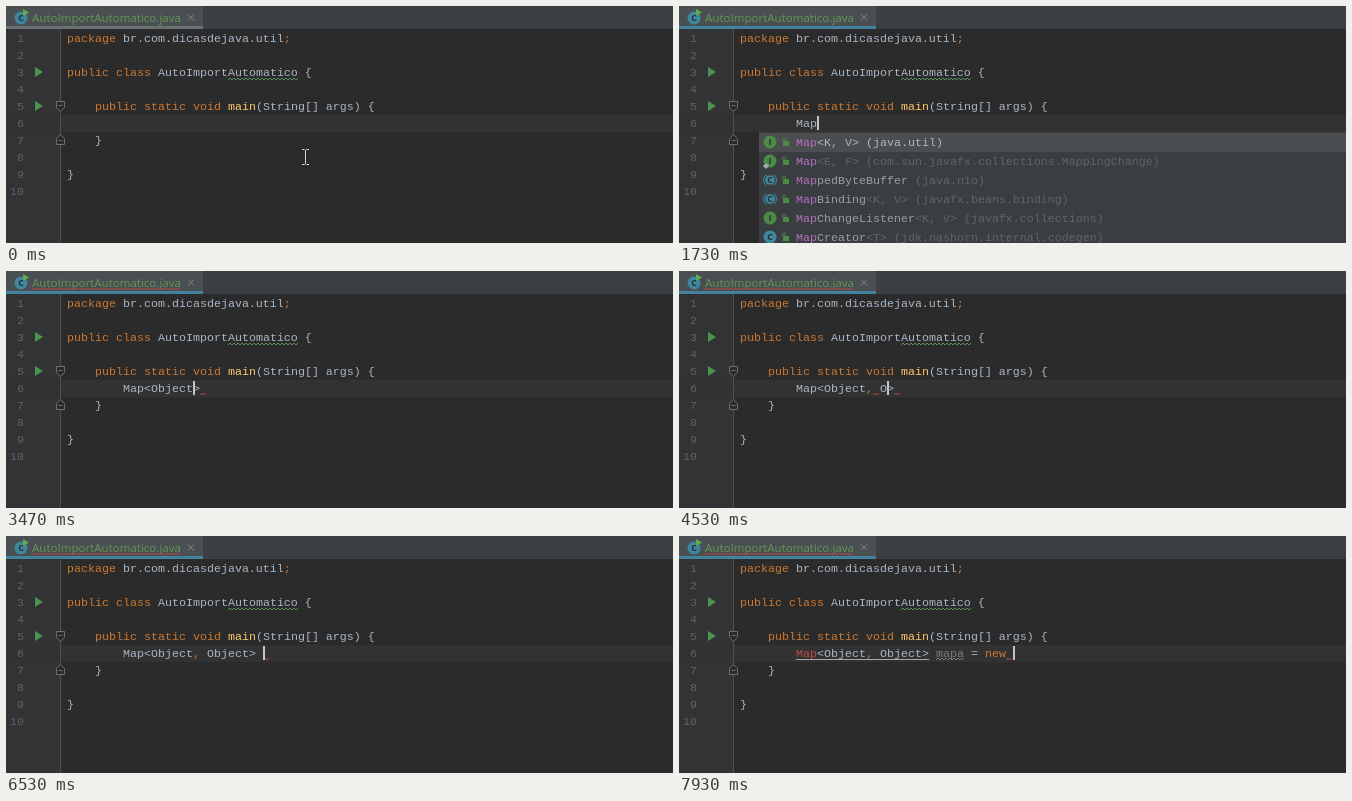
An HTML page for the animation above (8 s loop, 667 by 237 pixels).

```html
<!DOCTYPE html>
<html lang="en">
<head>
<meta charset="utf-8">
<title>Auto import</title>
<style>
  html, body { margin: 0; width: 100%; height: 100%; overflow: hidden; background: #2b2b2b; }
  svg { display: block; width: 667px; height: 237px; }
  text { white-space: pre; }
  .code { font: 11.667px "Liberation Mono", monospace; fill: #a9b7c6; }
  .ui { font: 11.55px "Open Sans", sans-serif; }
  .num { fill: #606366; text-anchor: end; }
  .badge { font: 700 9px "Open Sans", sans-serif; text-anchor: middle; fill: #26302f; }
  .kw { fill: #cc7832; }
  .fn { fill: #ffc66d; }
  .bad { fill: #bc4f4b; }
  .unused { fill: #7b7e84; }
  .brace { fill: #ffef28; }
  .hit { fill: #b56fc0; }
  .name { fill: #9b9ea0; }
  .tail { fill: #616466; }
  .chosen .name, .chosen .tail { fill: #b4b6b8; }
  .wave { fill: none; stroke-width: 1; }
</style>
</head>
<body>
<svg viewBox="0 0 667 237">
  <rect width="667" height="237" fill="#2b2b2b"/>
  <rect y="23" width="54" height="214" fill="#313335"/>
  <rect y="109" width="667" height="17" fill="#323232"/>
  <path d="M54.5 23V237" stroke="#4d4f50"/>
  <rect width="667" height="23" fill="#3c3f41"/>
  <rect width="197" height="23" fill="#4a4f51"/>
  <rect id="focus" y="20" width="197" height="3"/>
  <g id="tab"></g>
  <text class="ui" x="26" y="15.5" fill="#629755">AutoImportAutomatico.java</text>
  <path d="M182 8.500l6 6m0 -6l-6 6" stroke="#85888a"/>
  <g id="file"></g>
  <g fill="#4a9450"><path d="M29 61l8 5l-8 5z"/><path d="M29 95l8 5l-8 5z"/></g>
  <g fill="#2b2b2b" stroke="#6c6e70">
    <path d="M50.500 95.500h8v6l-4 4l-4 -4zM52.500 99.500h4"/>
    <path d="M50.500 138.500h8v-6l-4 -4l-4 4zM52.500 134.500h4"/>
  </g>
  <g id="live"></g>
  <path id="mouse" d="M-3.500 -7.500h2.500l1 1l1 -1h2.500M0 -6.500v13M-3.500 7.500h2.500l1 -1l1 1h2.500" fill="none" stroke="#d6d6d6"/>
</svg>
<script>
const LOOP = 8000, CH = 7, X0 = 117, TOP = 127, ROW = 19;
const $ = id => document.getElementById(id);
const esc = s => s.replace(/&/g, '&amp;').replace(/</g, '&lt;').replace(/>/g, '&gt;');
const span = (cls, s) => `<tspan class="${cls}">${esc(s)}</tspan>`;
const rect = (x, y, w, h, fill) => `<rect x="${x}" y="${y}" width="${w}" height="${h}" fill="${fill}"/>`;
const col = n => X0 + n * CH;

function wave(x1, x2, y, color) {
  let d = `M${x1} ${y + 1}`;
  for (let x = x1 + 2, up = true; x <= x2; x += 2, up = !up) d += `L${x} ${up ? y - 1 : y + 1}`;
  return `<path class="wave" d="${d}" stroke="${color}"/>`;
}

// Syntax colours; extra maps a word to a class
function paint(s, extra = {}) {
  const style = { main: 'fn', ...extra };
  return s.split(/(\b\w+\b|[;,])/).map(w =>
    style[w] ? span(style[w], w)
    : /^(package|public|class|static|void|new|[;,])$/.test(w) ? span('kw', w) : esc(w)).join('');
}
const code = (x, y, body) => `<text class="code" x="${x}" y="${y}">${body}</text>`;

function badge(x, y, kind) {
  const letter = kind[0], fill = letter === 'I' ? '#4c8a45' : '#3f86a0';
  if (letter === '0') {
    return rect(x - 4, y - 7, 9, 7, '#7f878c') + rect(x - 6, y, 13, 7, '#36586b') +
      `<text x="${x + .5}" y="${y + 6}" class="badge" style="font-size:7px;fill:#9fb6c2">01</text>`;
  }
  const abstract = kind.includes('a');
  let s = `<circle cx="${x}" cy="${y}" r="${abstract ? 4.8 : 6.5}" fill="${fill}"/>` +
    `<text class="badge" x="${x}" y="${y + 3.3}">${letter}</text>`;
  if (abstract) s += `<path d="M${x - 4} ${y - 5.5}q-5 5.500 0 11M${x + 4} ${y - 5.5}q5 5.500 0 11" fill="none" stroke="${fill}"/>`;
  if (kind.includes('s')) s += `<path d="M${x - 7} ${y + 5}l3 -3l3 3l-3 3z" fill="#a4aaad"/>`;
  return s;
}
const lock = (x, y) => rect(x - 3, y - 1, 6, 5, '#4c8a45') +
  `<path d="M${x - 3.5} ${y - 1}v-2q1.500 -2 3 0v2" fill="none" stroke="#4c8a45"/>`;

const objects = ['C Object (java.lang)', 'I Object (org.omg.CORBA)', 'Cs Objects (java.util)',
  'I ObjectInput (java.io)', 'C ObjectInputStream (java.io)', 'I ObjectInputValidation (java.io)'];
const lists = {
  map: { at: 0, items: ['I Map<K, V> (java.util)', 'Is Map<E, F> (com.sun.javafx.collections.MappingChange)',
    'Ca MappedByteBuffer (java.nio)', 'Ca MapBinding<K, V> (javafx.beans.binding)',
    'I MapChangeListener<K, V> (javafx.collections)', 'C MapCreator<T> (jdk.nashorn.internal.codegen)'] },
  raw: { at: 4, items: ['0 Object (java.lang)', '0 Objects (java.util)', '0 Object (org.omg.CORBA)',
    '0 Observable (java.util)', '0 ObjDoubleConsumer<T> (java.util.function)', '0 ObjIntConsumer<T> (java.util.function)'] },
  key: { at: 4, items: objects },
  rawValue: { at: 12 },
  value: { at: 12, items: objects },
  name: { at: 20, right: 640, items: ['- map', '- objectMap', '- objectObjectMap'] },
  make: { at: 27, right: 662, items: ['- new', '- null', '- notify()'] }
};
lists.rawValue.items = lists.raw.items;

function popup(id, typed) {
  const { at, items, right } = lists[id], x = col(at) - 37, w = (right || 667) - x;
  let s = rect(x, 126, w, right ? 73 : 111, '#3b3e40') + rect(x, TOP, w, ROW, '#4b4e50');
  items.forEach((item, i) => {
    const y = TOP + i * ROW + 9, [, kind, name, tail] = item.match(/^(\S+) (\w+)(.*)$/);
    let n = 0;
    while (n < typed.length && name[n] === typed[n]) n++;
    if (kind !== '-') s += badge(x + 11, y, kind);
    if (/[CI]/.test(kind)) s += lock(x + 27, y);
    s += `<g${i ? '' : ' class="chosen"'}>` +
      code(x + 37, y + 4, span('hit', name.slice(0, n)) + span('name', name.slice(n)) + span('tail', tail)) + '</g>';
  });
  if (right) s += `<text class="ui" x="${x + 5}" y="195" style="font-size:11px" fill="#7c7f81">Ctrl+Down and Ctrl+Up will move caret in the editor</text>`;
  return s;
}

// [time, line with | as the caret, popup, marks]
// marks: e = error after end, c = after comma, d = unresolved type, b = braces, u = unused name, h = name highlight
const steps = [
  [0, ''], [470, '|'],
  [1270, 'M|'], [1330, 'Ma|'], [1400, 'Ma|', 'map'], [1530, 'Map|', 'map'],
  [2130, 'Map<|>'], [2400, 'Map<O|>', '', 'e'], [2470, 'Map<Ob|>', '', 'e'],
  [2670, 'Map<Ob|>', 'raw', 'e'], [2730, 'Map<Obj|>', 'raw', 'e'], [2800, 'Map<Obje|>', 'raw', 'e'],
  [2870, 'Map<Objec|>', 'key', 'e'], [2930, 'Map<Object|>', 'key', 'e'],
  [3400, 'Map<Object|>', '', 'e'], [3930, 'Map<Object|>', '', 'de'],
  [4200, 'Map<Object,|>', '', 'e'], [4330, 'Map<Object, |>', '', 'ce'], [4530, 'Map<Object, O|>', '', 'ce'],
  [4730, 'Map<Object, Ob|>', '', 'ce'], [4800, 'Map<Object, Ob|>', 'rawValue', 'ce'],
  [5130, 'Map<Object, Obj|>', 'rawValue', 'ce'], [5200, 'Map<Object, Obje|>', 'value', 'ce'],
  [5400, 'Map<Object, Objec|>', 'value', 'ce'], [5530, 'Map<Object, Object|>', 'value', 'ce'],
  [6200, 'Map<Object, Object|>', '', 'ce'], [6330, 'Map<Object, Object>|', '', 'be'],
  [6530, 'Map<Object, Object> |', '', 'e'], [6600, 'Map<Object, Object> m|'],
  [6670, 'Map<Object, Object> ma|', 'name'], [6730, 'Map<Object, Object> map|', 'name'],
  [6800, 'Map<Object, Object> mapa|', 'name'], [6930, 'Map<Object, Object> mapa |', '', 'duh'],
  [7270, 'Map<Object, Object> mapa =|', '', 'duhs'], [7330, 'Map<Object, Object> mapa = |', '', 'duhe'],
  [7400, 'Map<Object, Object> mapa = |', '', 'due'],
  [7600, 'Map<Object, Object> mapa = n|', '', 'du'], [7670, 'Map<Object, Object> mapa = n|', 'make', 'du'],
  [7730, 'Map<Object, Object> mapa = ne|', 'make', 'du'], [7800, 'Map<Object, Object> mapa = new|', 'make', 'du'],
  [7930, 'Map<Object, Object> mapa = new |', '', 'dus']
];

function draw([time, src, list, marks = '']) {
  const caret = src.indexOf('|'), line = src.replace('|', ''), has = m => marks.includes(m);
  const red = '#b5463f', end = line.length, close = line.indexOf('>') + 1;
  let s = '';
  if (has('h')) s += rect(col(20), 109, 4 * CH, 17, '#344134');
  if (has('b')) s += rect(col(3), 109, CH, 17, '#3b514d') + rect(col(close - 1), 109, CH, 17, '#3b514d');
  s += code(X0, 121, paint(line, { ...(has('d') && { Map: 'bad' }), ...(has('u') && { mapa: 'unused' }) }));
  if (has('b')) s += code(col(3), 121, span('brace', '<')) + code(col(close - 1), 121, span('brace', '>'));
  if (has('d')) s += rect(X0, 123, close * CH, 1, '#a3a6a8');
  if (has('u')) s += wave(col(20), col(24), 123, '#77797c');
  if (has('c')) s += wave(col(11), col(12), 123, red);
  if (has('e')) s += wave(col(end), col(end) + 6, 123, red);
  if (has('s')) s += line.endsWith('=') ? wave(col(24), col(25), 123, red) : wave(col(end - 1), col(end), 123, red);
  if (caret >= 0) s += rect(col(caret), 110, 2, 14, '#c4c4c4');
  if (list) s += popup(list, line.slice(lists[list].at, caret));
  if (time >= 2400) s += wave(26, 175, 18, red);
  $('live').innerHTML = s;
  $('focus').setAttribute('fill', time >= 470 ? '#43829c' : '#6b7073');
}

$('tab').innerHTML = badge(15, 12, 'C') + '<path d="M17 3l6 3.500l-6 3.500z" fill="#5fae4d"/>';
$('file').innerHTML = ['package br.com.dicasdejava.util;', '', 'public class AutoImportAutomatico {', '',
  '    public static void main(String[] args) {', '', '    }', '', '}', ''].map((l, i) => {
  const y = 36 + i * 17;
  return `<text class="code num" x="18" y="${y}">${i + 1}</text>` + code(61, y, paint(l));
}).join('') + wave(222, 292, 73, '#588f5c');

let shown = -1;
function tick() {
  const t = performance.now() % LOOP;
  let i = steps.length - 1;
  while (steps[i][0] > t) i--;
  if (i !== shown) draw(steps[shown = i]);
  const k = Math.max(0, Math.min(5, Math.floor((t - 70) / 65) + 1)) / 5;
  $('mouse').setAttribute('transform', `translate(${299.5 - 20 * k} ${151 - 35 * k})`);
  $('mouse').style.display = t < 1270 ? '' : 'none';
  requestAnimationFrame(tick);
}
tick();
</script>
</body>
</html>
```
